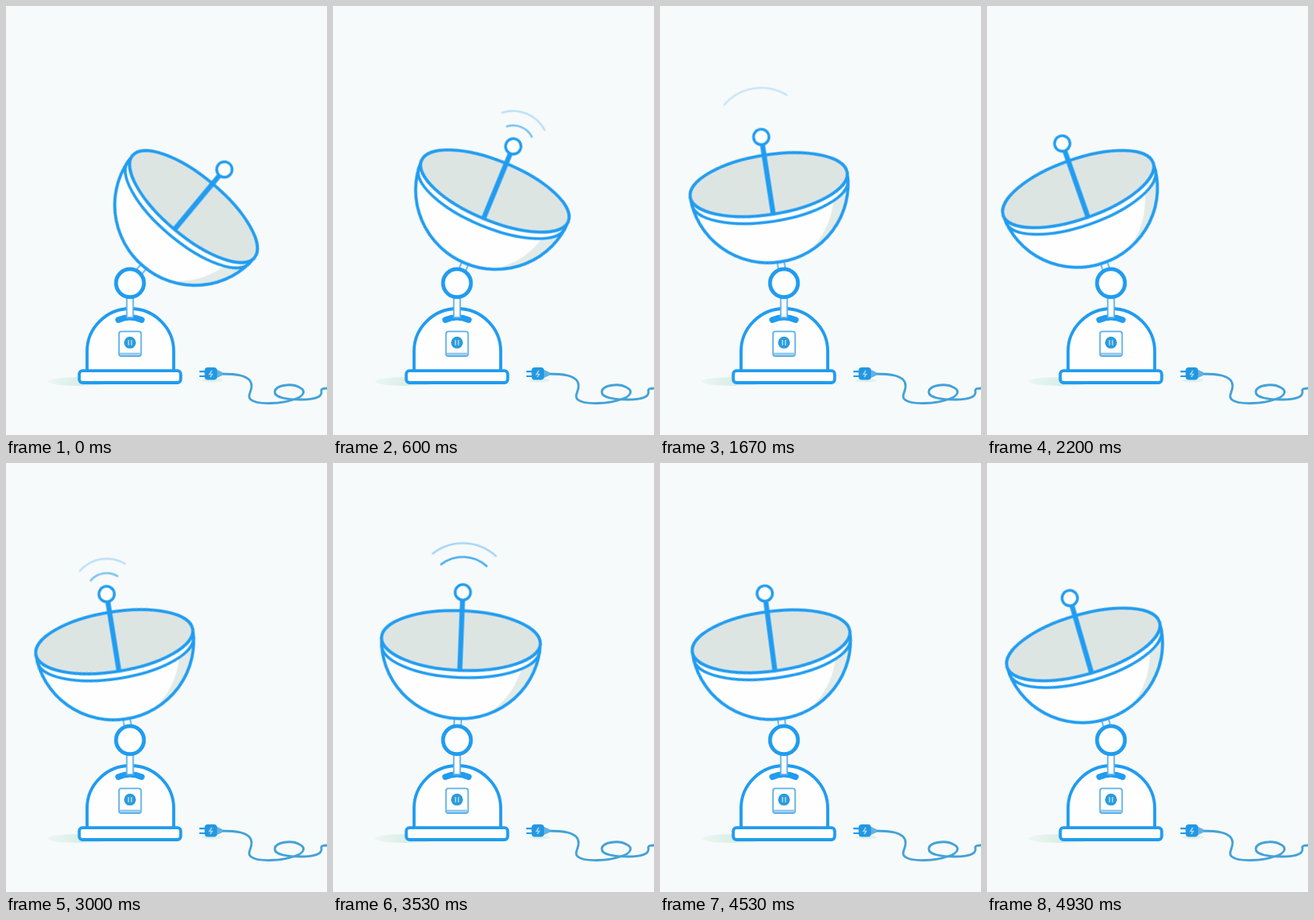
An HTML page for the animation above (4990 ms loop, 400x533 px).

```html
<!DOCTYPE html>
<html lang="en">
<head>
<meta charset="utf-8">
<title>Satellite dish</title>
<style>
  :root { --blue: #209cf0; --paper: #fefefe; --loop: 4990ms; }
  html, body { margin: 0; width: 100%; height: 100%; overflow: hidden; background: #f7fafa; }
  svg { display: block; width: 100%; height: 100%; }

  .line { fill: none; stroke: var(--blue); stroke-width: 3.8; stroke-linecap: round; stroke-linejoin: round; }
  .solid { fill: var(--paper); }
  .thin { stroke: #5cb0ea; stroke-width: 1.8; }

  .dish {
    transform-origin: 154.5px 344px;
    animation: swing var(--loop) infinite;
  }
  @keyframes swing {
    0%    { transform: rotate(39.9deg);  animation-timing-function: linear; }
    22.6% { transform: rotate(7.2deg);   animation-timing-function: cubic-bezier(.3, .43, .7, .95); }
    47.1% { transform: rotate(-20.5deg); animation-timing-function: cubic-bezier(.37, .12, .63, .9); }
    75.2% { transform: rotate(4.4deg);   animation-timing-function: cubic-bezier(.3, .02, .7, .68); }
    100%  { transform: rotate(-17.4deg); }
  }

  .wave { stroke-width: 2.6; opacity: 0; animation: var(--loop) linear infinite; }
  .near { animation-name: near; }
  .mid  { animation-name: mid; }
  .far  { animation-name: far; }
  @keyframes near {
    0%, 2.6%, 21.6%, 50.7%, 69.7%, 100% { opacity: 0; }
    12%, 60.1% { opacity: .6; }
    14.6%, 62.7% { opacity: .75; }
  }
  @keyframes mid {
    0%, 10.2%, 28.7%, 58.3%, 76.8%, 100% { opacity: 0; }
    12%, 60.1% { opacity: .27; }
    17.6%, 65.7% { opacity: .95; }
    22.6%, 70.7% { opacity: .85; }
  }
  @keyframes far {
    0%, 19.6%, 36.3%, 67.7%, 84.4%, 100% { opacity: 0; }
    22.6%, 70.7% { opacity: .38; }
    26.7%, 74.8% { opacity: .7; }
    33.5%, 81.6% { opacity: .22; }
  }
</style>
</head>
<body>
<svg viewBox="0 0 400 533" preserveAspectRatio="none">
  <defs>
    <linearGradient id="ground">
      <stop offset="0" stop-color="#d9eee6" stop-opacity=".35"/>
      <stop offset=".5" stop-color="#d9eee6"/>
    </linearGradient>
  </defs>

  <!-- Plug and cable -->
  <ellipse cx="257" cy="465" rx="13" ry="2.5" fill="#e2f1ec"/>
  <path d="M266 457C285 457 306 458 306 472C306 480 300 484 305 489C313 496 345 494 358 489C372 485 374 478 366 474C356 468 336 471 335 479C334 487 352 489 368 489C384 489 394 486 393 479C392 475 396 475 402 475"
        fill="none" stroke="#43a2d8" stroke-width="2.8"/>
  <path d="M241 454.2H249M241 460H249" class="line" style="stroke-width:2.2;stroke-linecap:butt"/>
  <path d="M262 451.5L269.5 455V459L262 462.5Z" fill="#62b2e2"/>
  <rect x="247.5" y="449" width="15.5" height="15.5" rx="4" fill="#2297e2"/>
  <path d="M256.5 453L253.5 457.5H257L254.5 461" fill="none" stroke="#a5d5f2" stroke-width="1.5"/>

  <!-- Base -->
  <ellipse cx="92" cy="466.5" rx="40" ry="5.5" fill="url(#ground)"/>
  <path class="line solid" d="M101 454V429A54 53 0 0 1 209 429V454Z"/>
  <rect class="line solid" x="91.3" y="453.2" width="126.4" height="14.8" rx="4"/>
  <path class="line" d="M140 390Q154.5 383.5 169 390" style="stroke-width:7.5"/>
  <rect class="solid thin" x="150.5" y="360" width="8" height="27"/>
  <rect class="solid thin" x="140.8" y="404.3" width="27.6" height="30.7" rx="3"/>
  <path d="M142 432.2H167.4" stroke="#94c9ec" stroke-width="3"/>
  <circle cx="154.5" cy="418.2" r="7.4" fill="#2a9bdc"/>
  <path d="M152.6 415V421.4M156.4 415V421.4" stroke="#b5dcf0" stroke-width="1.5"/>

  <!-- Dish, drawn upright and swung about the joint -->
  <g class="dish">
    <rect class="solid thin" x="150.2" y="312" width="8.6" height="20"/>
    <path class="solid" d="M55.5 220.5A99 97 0 0 0 253.5 220.5Z"/>
    <path d="M231.5 252Q245 244 252.5 230A99 97 0 0 1 189 311Q221 291 231.5 252Z" fill="#e3ebe8"/>
    <path class="line" d="M55.5 220.5A99 97 0 0 0 253.5 220.5"/>
    <path class="line" d="M56 229.5A98.5 37 0 0 0 253 229.5" style="stroke-width:3.4"/>
    <ellipse class="line" cx="154.5" cy="220.5" rx="99" ry="37.2" style="fill:#dde5e3"/>
    <path class="line" d="M154.5 170V257" style="stroke-width:6.2;stroke-linecap:butt"/>
    <circle class="line solid" cx="154.5" cy="160.5" r="9.6" style="stroke-width:3.4"/>
    <g transform="translate(154.5 160.5)">
      <path class="line wave near" d="M-16.7 -19.9A26 26 0 0 1 16.7 -19.9"/>
      <path class="line wave mid" d="M-28.3 -33.7A44 44 0 0 1 28.3 -33.7"/>
      <path class="line wave far" d="M-39.2 -46.7A61 61 0 0 1 39.2 -46.7"/>
    </g>
  </g>
  <circle class="line solid" cx="154.5" cy="344.3" r="17.4" style="stroke-width:4.8"/>
</svg>
</body>
</html>
```
